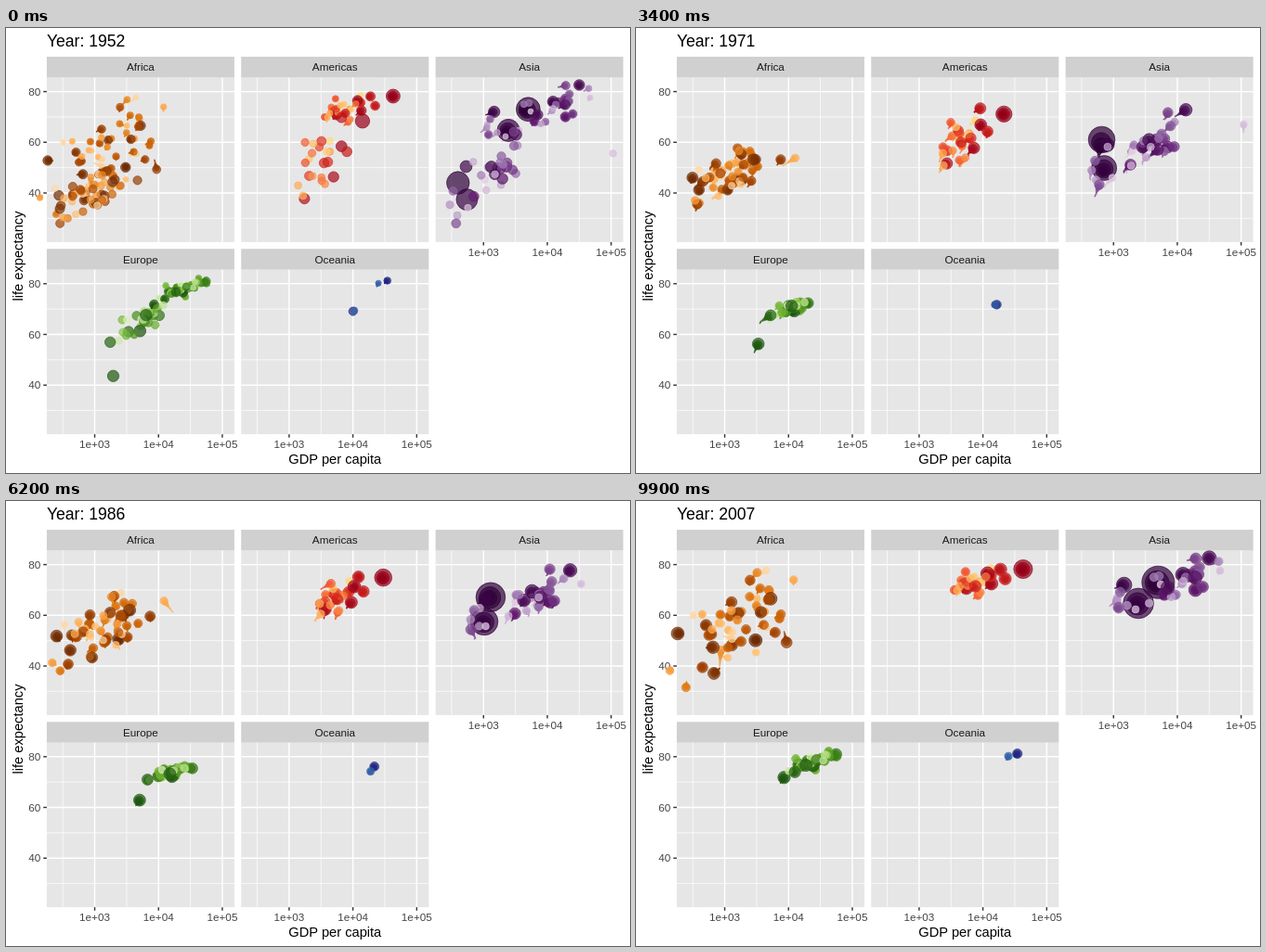
An HTML page with a canvas that plays this animation: 672x480 px, repeating every 10000 ms.

```html
<!DOCTYPE html>
<html lang="en">
<head>
<meta charset="utf-8">
<title>Life expectancy and GDP</title>
<style>
  html, body { margin: 0; width: 100%; height: 100%; overflow: hidden; background: #fff; }
  svg, canvas { position: absolute; left: 0; top: 0; width: 672px; height: 480px; }
  text { font-family: "Liberation Sans", Arial, sans-serif; font-size: 11.73px; fill: #444; text-anchor: middle; }
  .strip { fill: #1a1a1a; }
  .axis { font-size: 14.67px; fill: #000; }
  .title { font-size: 17.6px; fill: #000; text-anchor: start; }
  .value { text-anchor: end; }
  .major { stroke: #fff; stroke-width: 1.42; }
  .minor { stroke: #fff; stroke-width: .71; }
  .tick { stroke: #333; stroke-width: 1.42; }
</style>
</head>
<body>
<svg id="chart" viewBox="0 0 672 480"></svg>
<canvas id="dots" width="672" height="480"></canvas>
<script>
const FRAMES = 100, STEP = 100, WAKE = 10;
const FIRST = 1952, SPAN = 55, SURVEYS = 11;
const W = 202.03, H = 177.5, STRIP = 22.4, GAP = 7.33, LEFT = 43.9, TOP = 53.4;
const KX = W / 2.9404, KY = H / 64.904;
const GAMMA = 1.22;

// cloud: [year, log GDP, its spread, life expectancy, its spread]
// tilt: how strongly life expectancy follows GDP
// pop: range of populations in millions; share: part of it at the start
// leaders: single bubbles with a path of [year, log GDP, life expectancy]
const panels = [
  {
    name: "Africa", col: 0, row: 0, count: 49, tilt: .5, share: .27, pop: [.6, 90],
    colors: ["7f3b08", "b35806", "e08214", "fdb863", "fee0b6"],
    cloud: [
      [1952, 2.98, .28, 38.8, 5],
      [1972, 3.11, .29, 47.3, 5.5],
      [1987, 3.13, .36, 53.5, 7],
      [2007, 3.22, .43, 55, 9.3]
    ],
    leaders: [
      { pop: 44, path: [[1952, 3.67, 45], [1972, 3.89, 53.7], [1992, 3.86, 61.9], [2007, 3.97, 49.3]] },
      { pop: 6, path: [[1952, 3.38, 42.7], [1977, 4.34, 57.4], [1987, 4.07, 66.2], [2007, 4.08, 74]] },
      { pop: 9, path: [[1952, 2.69, 40], [1987, 2.93, 44], [1992, 2.87, 23.6], [2007, 2.94, 46.2]] }
    ]
  },
  {
    name: "Americas", col: 1, row: 0, count: 24, tilt: .6, share: .42, pop: [2, 150],
    colors: ["a50026", "d73027", "f46d43", "fdae61", "fee090"],
    cloud: [
      [1952, 3.5, .21, 53, 8.5],
      [1972, 3.69, .21, 62, 6.5],
      [1987, 3.79, .22, 68, 4.7],
      [2007, 3.92, .25, 73.6, 3.2]
    ],
    leaders: [
      { pop: 301, path: [[1952, 4.15, 68.4], [1972, 4.34, 71.3], [1987, 4.48, 75], [2007, 4.63, 78.2]] }
    ]
  },
  {
    name: "Asia", col: 2, row: 0, count: 29, tilt: .7, share: .39, pop: [2, 200],
    colors: ["40004b", "762a83", "9970ab", "c2a5cf", "e7d4e8"],
    cloud: [
      [1952, 3.12, .36, 46, 8.5],
      [1972, 3.47, .45, 57, 7],
      [1987, 3.62, .48, 65, 6],
      [2007, 3.88, .5, 71, 5.8]
    ],
    leaders: [
      { pop: 1319, path: [[1952, 2.6, 44], [1962, 2.69, 44.5], [1972, 2.83, 63.1], [1992, 3.22, 68.7], [2007, 3.7, 73]] },
      { pop: 1110, path: [[1952, 2.74, 37.4], [1972, 2.86, 50.6], [1992, 3.07, 60.2], [2007, 3.39, 64.7]] },
      { pop: 127, path: [[1952, 3.51, 63], [1972, 4.17, 73.4], [1992, 4.43, 79.4], [2007, 4.5, 82.6]] },
      { pop: 2.5, path: [[1952, 5.03, 55.6], [1972, 5.04, 67.7], [1982, 4.5, 71.3], [2007, 4.67, 77.6]] }
    ]
  },
  {
    name: "Europe", col: 0, row: 1, count: 29, tilt: .85, share: .75, pop: [1, 82],
    colors: ["276419", "4d9221", "7fbc41", "b8e186", "e6f5d0"],
    cloud: [
      [1952, 3.7, .25, 65, 4.6],
      [1972, 4.06, .18, 71, 1.8],
      [1987, 4.18, .2, 74, 2.1],
      [2007, 4.36, .24, 78, 2.6]
    ],
    leaders: [
      { pop: 71, path: [[1952, 3.29, 43.6], [1972, 3.54, 57], [1987, 3.71, 63.1], [2007, 3.93, 71.8]] }
    ]
  },
  {
    name: "Oceania", col: 1, row: 1, count: 0, share: .45,
    colors: ["313695", "4575b4"],
    leaders: [
      { pop: 20.4, path: [[1952, 4, 69.1], [1972, 4.23, 71.9], [1987, 4.34, 76.3], [2007, 4.54, 81.2]] },
      { pop: 4.1, path: [[1952, 4.02, 69.4], [1972, 4.2, 71.9], [1987, 4.28, 74.3], [2007, 4.4, 80.2]] }
    ]
  }
];

for (const p of panels) {
  p.x = LEFT + p.col * (W + GAP);
  p.y = TOP + p.row * (H + GAP + STRIP);
}

const lerp = (a, b, u) => a + (b - a) * u;
const clamp = (v, lo, hi) => Math.min(hi, Math.max(lo, v));
const px = (p, logGdp) => p.x + (logGdp - 2.2484) * KX;
const py = (p, life) => p.y + (85.553 - life) * KY;

let seed = 29;
function random() {
  seed = (seed + 0x6d2b79f5) | 0;
  let t = Math.imul(seed ^ (seed >>> 15), 1 | seed);
  t = (t + Math.imul(t ^ (t >>> 7), 61 | t)) ^ t;
  return ((t ^ (t >>> 14)) >>> 0) / 4294967296;
}
const normal = () => clamp((random() + random() + random() - 1.5) * 2, -2, 2);

// Blends rows that begin with a year.
function rowAt(rows, year) {
  let i = 1;
  while (i < rows.length - 1 && rows[i][0] < year) i++;
  const a = rows[i - 1], b = rows[i], u = (year - a[0]) / (b[0] - a[0]);
  return a.map((v, k) => lerp(v, b[k], u));
}

// One node per five-year survey.
const survey = node => Array.from({ length: SURVEYS + 1 }, (_, k) => node(FIRST + k * SPAN / SURVEYS, k / SURVEYS));

// A dot keeps roughly its place within the cloud, drifting and wobbling a little.
function cloudDot(p) {
  const a0 = normal(), b0 = normal();
  const a1 = .85 * a0 + .5 * normal(), b1 = .85 * b0 + .5 * normal();
  const nodes = survey((year, u) => {
    const [, gdp, gdpSpread, life, lifeSpread] = rowAt(p.cloud, year);
    const a = lerp(a0, a1, u), b = lerp(b0, b1, u);
    const rise = p.tilt * a + Math.sqrt(1 - p.tilt ** 2) * b;
    return {
      gdp: gdp + gdpSpread * a + .035 * normal(),
      life: clamp(life + lifeSpread * rise + .35 * normal(), 28, 82.4)
    };
  });
  return { pop: p.pop[0] * (p.pop[1] / p.pop[0]) ** random(), nodes };
}

function leaderDot({ pop, path }) {
  const nodes = survey(year => {
    const [, gdp, life] = rowAt(path, year);
    return { gdp, life };
  });
  return { pop, nodes };
}

function shade(colors, u) {
  const pos = u * (colors.length - 1), i = Math.min(Math.floor(pos), colors.length - 2);
  const channel = (hex, k) => parseInt(hex.slice(k, k + 2), 16);
  const rgb = [0, 2, 4].map(k => {
    const v = lerp(channel(colors[i], k), channel(colors[i + 1], k), pos - i);
    return Math.round(255 * (v / 255) ** GAMMA);
  });
  return `rgb(${rgb})`;
}

// Within a panel, the most populous dot takes the darkest shade.
const dots = panels.flatMap(p => {
  const cloud = Array.from({ length: p.count }, () => cloudDot(p));
  const group = [...p.leaders.map(leaderDot), ...cloud];
  const ranked = [...group].sort((a, b) => b.pop - a.pop);
  ranked.forEach((dot, i) => {
    dot.panel = p;
    dot.color = shade(p.colors, i / (ranked.length - 1));
  });
  return group;
});

function place({ panel, pop, nodes }, frame) {
  const u = frame / (FRAMES - 1);
  const i = Math.min(Math.floor(u * SURVEYS), SURVEYS - 1), v = u * SURVEYS - i;
  const people = pop * lerp(panel.share, 1, u);
  return {
    x: px(panel, lerp(nodes[i].gdp, nodes[i + 1].gdp, v)),
    y: py(panel, lerp(nodes[i].life, nodes[i + 1].life, v)),
    size: 2 + 10 * Math.sqrt(people / 1319)
  };
}

function buildChart() {
  const out = [];
  const rect = (x, y, w, h, fill) => out.push(`<rect x="${x}" y="${y}" width="${w}" height="${h}" fill="${fill}"/>`);
  const line = (x1, y1, x2, y2, kind) => out.push(`<line x1="${x1}" y1="${y1}" x2="${x2}" y2="${y2}" class="${kind}"/>`);
  const text = (x, y, label, kind = "", more = "") => out.push(`<text x="${x}" y="${y}" class="${kind}" ${more}>${label}</text>`);

  for (const p of panels) {
    const right = p.x + W, bottom = p.y + H;
    rect(p.x, p.y, W, H, "#e6e6e6");
    rect(p.x, p.y - STRIP, W, STRIP, "#d0d0d0");
    text(p.x + W / 2, p.y - 7, p.name, "strip");
    const across = (v, kind) => line(p.x, py(p, v), right, py(p, v), kind);
    const down = (v, kind) => line(px(p, v), p.y, px(p, v), bottom, kind);
    [30, 50, 70].forEach(v => across(v, "minor"));
    [2.5, 3.5, 4.5].forEach(v => down(v, "minor"));
    [40, 60, 80].forEach(v => across(v, "major"));
    [3, 4, 5].forEach(v => down(v, "major"));
    if (p.col === 0) {
      for (const v of [40, 60, 80]) {
        line(p.x - 3.67, py(p, v), p.x, py(p, v), "tick");
        text(p.x - 6.6, py(p, v) + 4.2, v, "value");
      }
    }
    if (p.row === 1 || p.col === 2) {
      for (const v of [3, 4, 5]) {
        line(px(p, v), bottom, px(p, v), bottom + 3.67, "tick");
        text(px(p, v), bottom + 15, `1e+0${v}`);
      }
    }
  }
  text(354.3, 470, "GDP per capita", "axis");
  text(0, 0, "life expectancy", "axis", 'transform="translate(18 246) rotate(-90)"');
  text(LEFT, 20, "", "title", 'id="title"');
  document.getElementById("chart").innerHTML = out.join("");
}

buildChart();
const title = document.getElementById("title");
const canvas = document.getElementById("dots");
const ctx = canvas.getContext("2d");

// Each dot drags a wake of its earlier, shrinking selves.
function draw(frame) {
  title.textContent = "Year: " + Math.round(FIRST + SPAN * frame / (FRAMES - 1));
  ctx.clearRect(0, 0, canvas.width, canvas.height);
  ctx.globalAlpha = .7;
  ctx.lineWidth = .945;
  for (let lag = WAKE - 1; lag >= 0; lag--) {
    const scale = (1 - lag / WAKE) ** 3;
    for (const dot of dots) {
      const { x, y, size } = place(dot, (frame - lag + FRAMES) % FRAMES);
      ctx.fillStyle = ctx.strokeStyle = dot.color;
      ctx.beginPath();
      ctx.arc(x, y, (2.845 * size * scale + .945) / 2, 0, 2 * Math.PI);
      ctx.fill();
      ctx.stroke();
    }
  }
}

let shown = -1;
function tick() {
  const frame = Math.floor(performance.now() / STEP) % FRAMES;
  if (frame !== shown) draw(shown = frame);
  requestAnimationFrame(tick);
}
tick();
</script>
</body>
</html>
```
